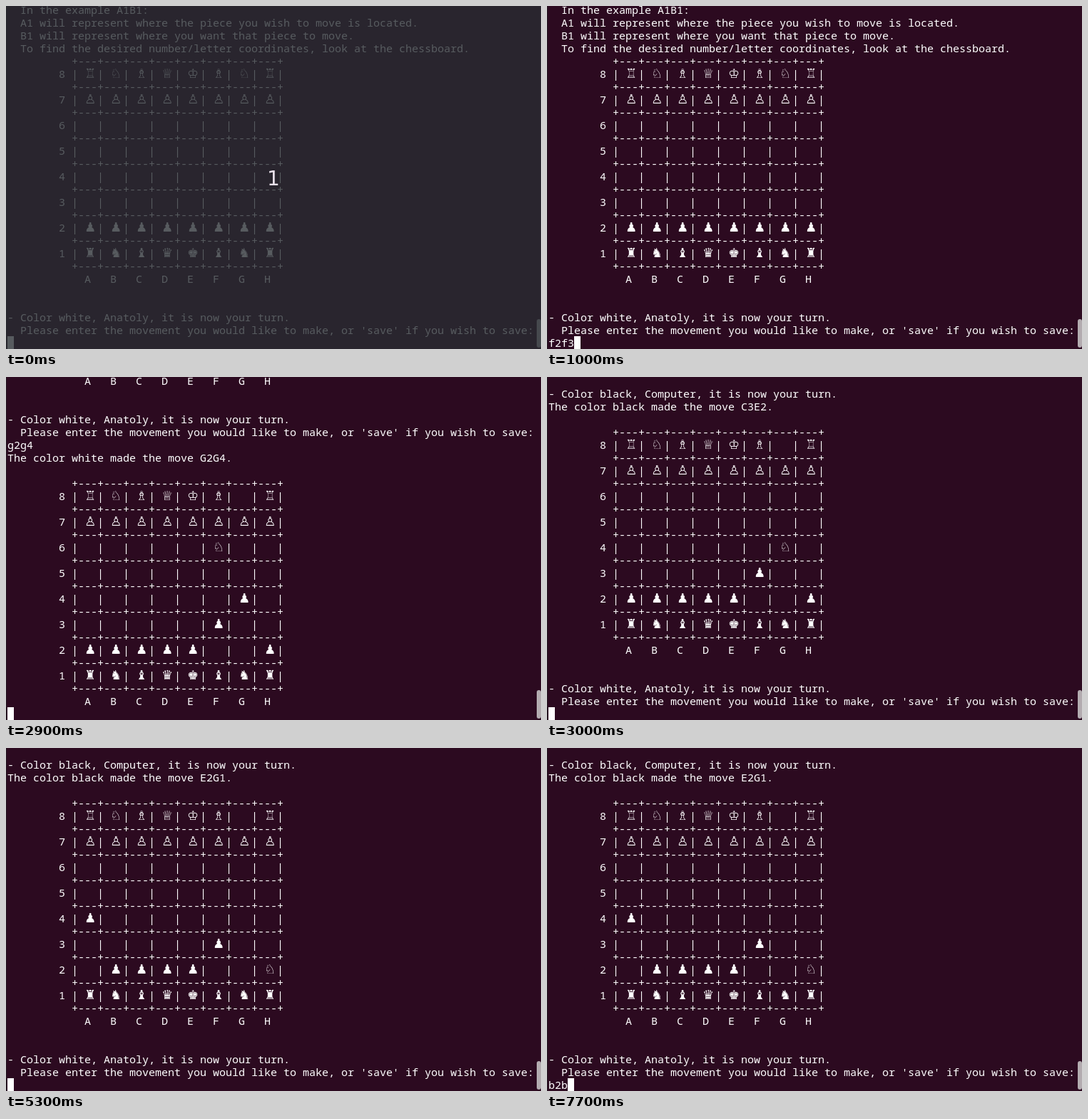
Write an HTML page with a canvas that moves like this. It is 750 by 482 pixels and loops after 8000 ms.

```html
<!DOCTYPE html>
<html lang="en">
<head>
<meta charset="utf-8">
<title>Terminal chess</title>
<style>
  html, body { margin: 0; width: 750px; height: 482px; overflow: hidden; background: #2c0a20; }
  canvas { display: block; }
</style>
</head>
<body>
<canvas id="stage" width="750" height="482"></canvas>
<script>
const ctx = document.getElementById('stage').getContext('2d');
const LOOP = 8000, CELL = 9, LINE = 18, LEFT = 2, TOP = -4;
const BG = '#2c0a20', INK = '#ffffff';
const TEXT_FONT = '15px "Noto Sans Mono", "DejaVu Sans Mono", monospace';
const PIECE_FONT = '18px "DejaVu Sans", sans-serif';
const FILES = 'ABCDEFGH';
const PLAYER = 'Anatoly';

const START = ['♖♘♗♕♔♗♘♖', '♙♙♙♙♙♙♙♙', '        ', '        ',
               '        ', '        ', '♟♟♟♟♟♟♟♟', '♜♞♝♛♚♝♞♜'];

// Plays moves such as "F2F3" from the opening position.
function play(...moves) {
  const rows = START.map(r => [...r]);
  for (const m of moves) {
    const [x0, x1] = [FILES.indexOf(m[0]), FILES.indexOf(m[2])];
    const [y0, y1] = [8 - m[1], 8 - m[3]];
    rows[y1][x1] = rows[y0][x0];
    rows[y0][x0] = ' ';
  }
  return rows;
}

const labels = ' '.repeat(12) + [...FILES].join('   ');
const prompt = [
  `- Color white, ${PLAYER}, it is now your turn.`,
  "  Please enter the movement you would like to make, or 'save' if you wish to save:"
];
const reply = move => ['', '- Color black, Computer, it is now your turn.',
  `The color black made the move ${move}.`, ''];

const intro = {
  head: ['  In the example A1B1:',
    '  A1 will represent where the piece you wish to move is located.',
    '  B1 will represent where you want that piece to move.',
    '  To find the desired number/letter coordinates, look at the chessboard.'],
  board: play(), tail: ['', '', ...prompt]
};
const second = { head: reply('A2C3'), board: play('F2F3', 'G8F6'), tail: intro.tail };
const moved = {
  head: [labels, '', '', ...prompt, 'g2g4', 'The color white made the move G2G4.', ''],
  board: play('F2F3', 'G8F6', 'G2G4'), tail: []
};
const third = { head: reply('C3E2'), board: play('F2F3', 'G8F6', 'G2G4', 'F6G4'), tail: intro.tail };
const fourth = {
  head: reply('E2G1'),
  board: play('F2F3', 'G8F6', 'G2G4', 'F6G4', 'A2A4', 'G4H2'), tail: intro.tail
};

// Start time, screen, typed input, cursor hidden.
const steps = [
  [0, intro, ''], [700, intro, 'f2'], [1000, intro, 'f2f3'],
  [1300, second, ''], [2000, second, 'g2'], [2400, second, 'g2g'], [2800, second, 'g2g4'],
  [2900, moved, ''],
  [3000, third, ''], [3600, third, '', true], [3700, third, 'a'], [4100, third, 'a2'],
  [4700, third, 'a2a'], [5200, third, 'a2a4'],
  [5300, fourth, ''], [5900, fourth, '', true], [6500, fourth, ''],
  [7100, fourth, 'b2'], [7700, fourth, 'b2b']
];

const colX = c => LEFT + c * CELL;
const rowY = r => TOP + r * LINE;

function print(text, row, col = 0) {
  ctx.font = TEXT_FONT;
  [...text].forEach((ch, i) => {
    if (ch !== ' ') ctx.fillText(ch, colX(col + i), rowY(row) + 15);
  });
}

function drawBoard(board, top) {
  const rule = '+---'.repeat(8) + '+';
  board.forEach((rank, i) => {
    const row = top + 1 + i * 2;
    print(rule, row - 1, 10);
    print(8 - i + ' ' + '|   '.repeat(8) + '|', row, 8);
    ctx.font = PIECE_FONT;
    rank.forEach((p, x) => {
      if (p !== ' ') ctx.fillText(p, colX(12 + x * 4), rowY(row) + 15);
    });
  });
  print(rule, top + 16, 10);
  print(labels, top + 17);
}

function drawCountdown() {
  ctx.fillStyle = 'rgba(40,45,51,0.78)';
  ctx.fillRect(0, 0, 750, 482);
  ctx.fillStyle = '#e8e0ea';
  ctx.font = '28px "DejaVu Sans", sans-serif';
  ctx.textAlign = 'center';
  ctx.fillText('1', 375, 252);
  ctx.textAlign = 'left';
}

function draw(t) {
  const [, screen, input, hidden] = steps.filter(s => s[0] <= t).pop();
  ctx.fillStyle = BG;
  ctx.fillRect(0, 0, 750, 482);
  ctx.fillStyle = '#221722';
  ctx.fillRect(0, 0, 1, 482);

  ctx.fillStyle = INK;
  const top = screen.head.length;
  screen.head.forEach((line, i) => print(line, i));
  drawBoard(screen.board, top);
  screen.tail.forEach((line, i) => print(line, top + 18 + i));
  print(input, 26);
  if (!hidden) ctx.fillRect(colX(input.length), rowY(26), CELL, LINE);

  ctx.fillStyle = '#b3acb0';
  ctx.beginPath();
  ctx.roundRect(744, 440, 6, 40, 3);
  ctx.fill();

  if (t < 200) drawCountdown();
}

const begin = performance.now();
function tick() {
  draw((performance.now() - begin) % LOOP);
  requestAnimationFrame(tick);
}
tick();
</script>
</body>
</html>
```
